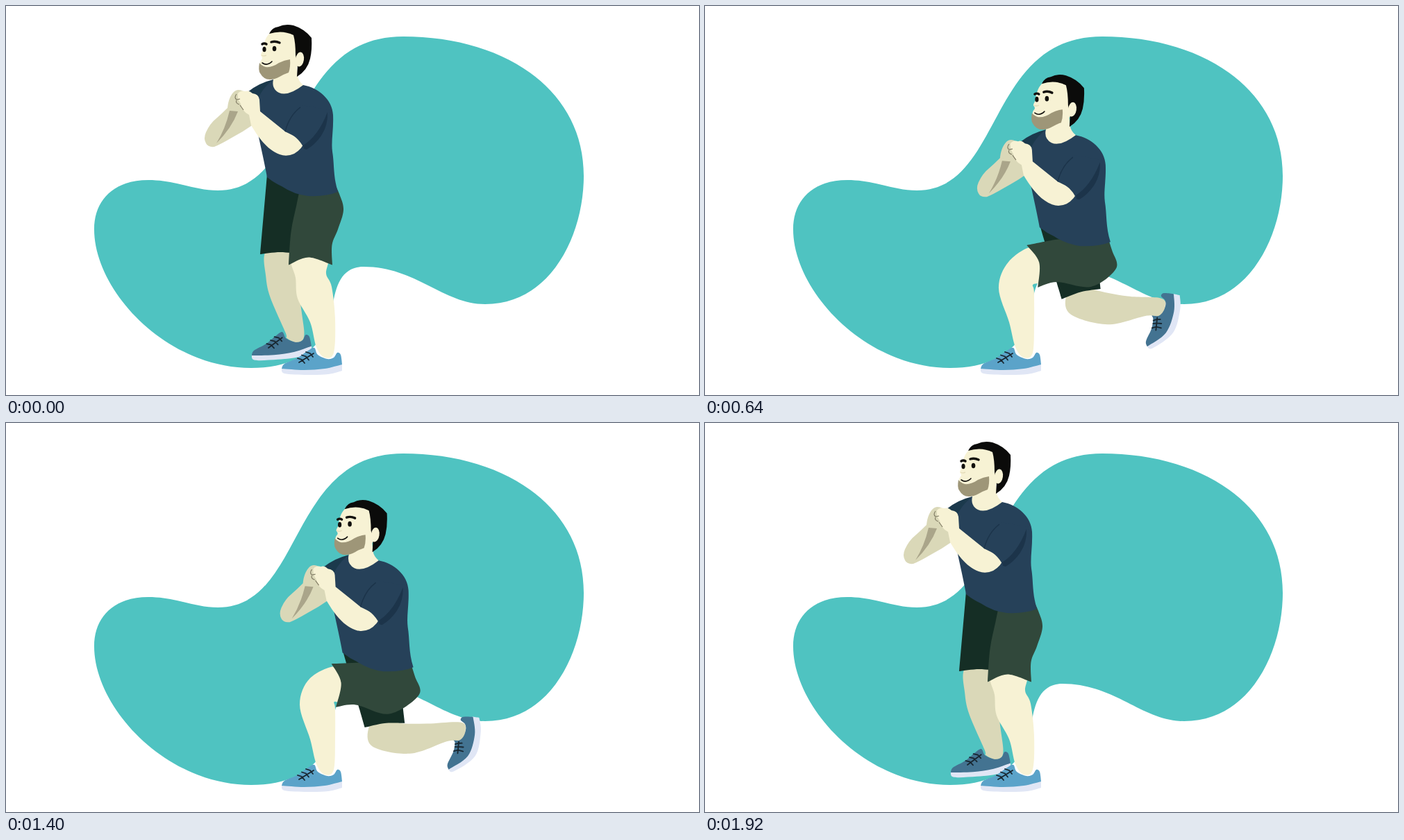
These frames come from a looping animation (998x561 px, 1960 ms). An HTML page:

```html
<!DOCTYPE html>
<html lang="en">
<head>
<meta charset="utf-8">
<title>Lunge</title>
<style>
html, body { margin: 0; width: 100%; height: 100%; overflow: hidden; background: #fff; }
svg { display: block; width: 100%; height: 100%; }
</style>
</head>
<body>
<svg viewBox="0 0 998 561">
  <path fill="#4fc3c1" d="M127 322C127 280 155 251 205 251C245 251 270 266 305 266C430 266 405 44 572 44C715 44 832 118 832 245C832 330 785 430 690 430C630 430 590 376 515 376C485 376 475 400 470 435C460 500 410 522 353 522C230 522 127 410 127 322Z"/>
  <g id="backShoe"></g>
  <path id="backLeg" fill="#dad8b8"/>
  <path id="backShorts" fill="#152e25"/>
  <g id="frontShoe"></g>
  <path id="frontLeg" fill="#f7f2d4"/>
  <path id="frontShorts" fill="#31483b"/>
  <g id="torso">
    <!-- far arm -->
    <path fill="#dad8b8" d="M319 147C320 138 322 131 327 125Q333 118 342 123L352 145L356 171Q342 181 325 190Q308 200 300 203Q291 204 288 198Q284 191 288 182Q294 169 303 162Q311 155 319 147Z"/>
    <path fill="#aaa58a" d="M322 151L334 152Q325 176 303 198Q316 177 322 151Z"/>
    <path fill="#1b394c" d="M348 124Q364 111 385 106L380 130L360 150Z"/>
    <!-- shirt -->
    <path fill="#264159" d="M385 106Q396 114 428 114C450 118 470 135 471 157C472 178 468 195 470 210C473 228 471 246 478 268Q462 275 435 274Q415 272 397 260Q386 255 376 247Q374 236 370 217L362 180L357 150Q364 122 385 106Z"/>
    <!-- neck and head -->
    <path fill="#f7f2d4" d="M385 106Q382 119 393 125Q406 131 428 114Q421 108 420 101L417 72L386 96Z"/>
    <path fill="#f7f2d4" d="M380 39C373 46 371 55 370 64Q367 69 367 71Q369 73 369 76Q365 80 365 88L380 104L409 95L424 85L418 40L400 34Z"/>
    <path fill="#0b0b0a" d="M379 40Q383 31 392 30Q402 25 414 28Q430 33 440 46Q441 63 438 76Q434 93 419 102L420 85L417 71Q417 53 414 42Q398 34 379 40Z"/>
    <ellipse cx="423" cy="77" rx="6" ry="10.500" fill="#f7f2d4" transform="rotate(8 423 77)"/>
    <path fill="#9e9678" d="M365 82Q363 93 366 97Q371 106 380 106Q387 106 394 102Q401 98 407 96Q410 88 409 77Q401 78 393 82Q383 89 374 88Q368 86 365 82Z"/>
    <g fill="none" stroke="#12100d" stroke-linecap="round">
      <path stroke-width="3.400" d="M369 55Q372 53 375 55M382 52Q388 50 394 53"/>
      <path stroke-width="1.600" d="M369 82Q376 87 383 80"/>
    </g>
    <ellipse cx="372" cy="62.500" rx="2.600" ry="3.800" fill="#12100d"/>
    <ellipse cx="386.500" cy="61.500" rx="2.800" ry="3.800" fill="#12100d"/>
    <path fill="none" stroke="#e4dcb8" stroke-width="1.500" d="M368 71Q371 73 375 71"/>
    <!-- near arm -->
    <path fill="#f7f2d4" d="M334 126Q338 121 345 123Q350 121 355 126Q364 127 365 135L366 152L402 181L430 195Q427 206 415 213Q404 218 394 214C375 207 362 187 353 172L350 157Q339 151 338 141Q333 134 334 126Z"/>
    <path fill="none" stroke="#837e66" stroke-width="1.200" d="M332 127Q328 132 332 135L337 134M332 136Q330 140 336 142M337 143L342 150"/>
    <path fill="#264159" d="M426 143Q410 155 402 181Q420 187 429 205Q455 190 467 150Z"/>
    <path fill="#1c344a" d="M429 206L428 201Q450 187 463 153Q464 172 454 187Q445 200 433 207Z"/>
    <path fill="none" stroke="#1c344a" stroke-width="1.500" d="M424 146Q408 158 402 181"/>
  </g>
</svg>
<script>
const LOOP = 1960, STEP = 40;
const $ = id => document.getElementById(id);
const mix = (a, b, k) => a + (b - a) * k;
const between = (p, q, k) => [mix(p[0], q[0], k), mix(p[1], q[1], k)];
const ease = k => (1 - Math.cos(Math.PI * Math.min(Math.max(k, 0), 1))) / 2;

// Turns local points about an origin into stage points.
function frame([ox, oy], degrees = 0) {
  const a = degrees * Math.PI / 180, c = Math.cos(a), s = Math.sin(a);
  return (x, y) => [ox + x * c - y * s, oy + x * s + y * c];
}

// Closed smooth curve; indices listed in corners stay sharp.
function smooth(pts, corners = []) {
  const n = pts.length, at = i => pts[(i + n) % n];
  const sharp = i => corners.includes((i + n) % n);
  let d = 'M' + pts[0];
  for (let i = 0; i < n; i++) {
    const p = at(i), q = at(i + 1);
    const before = sharp(i) ? p : at(i - 1), after = sharp(i + 1) ? q : at(i + 2);
    const c1 = p.map((v, k) => v + (q[k] - before[k]) / 6);
    const c2 = q.map((v, k) => v - (after[k] - p[k]) / 6);
    d += `C${c1} ${c2} ${q}`;
  }
  return d + 'Z';
}

const setShape = (id, pts, corners) => $(id).setAttribute('d', smooth(pts, corners));

// The shoe lies around the ankle; its front curls up by bend degrees.
function drawShoe(id, color, ankle, angle, bend) {
  const place = frame(ankle, angle);
  const curl = ([x, y]) => {
    const amount = Math.min(Math.max((-10 - x) / 25, 0), 1);
    return place(...frame([-18, 10], bend * amount)(x + 18, y - 10));
  };
  const upper = [[-62, 16], [-58, 9], [-40, 1], [-24, -10], [-15, -14], [-10, -4],
    [4, 2], [13, 0], [18, -7], [23, -4], [25, 10], [0, 16], [-30, 18]].map(curl);
  const sole = [[-62, 15], [-58, 23], [-25, 25], [5, 24], [25, 19], [25, 9], [-30, 14]].map(curl);
  let laces = 'M' + [[-37, 7], [-16, -6]].map(curl).join('L');
  for (let i = 0; i < 3; i++)
    laces += 'M' + [[-39, 1], [-33, 3], [-29, 8]].map(([x, y]) => curl([x + 6 * i, y - 4.5 * i])).join('L');
  $(id).innerHTML = `<path fill="#e0e6f5" d="${smooth(sole, [0, 4, 5])}"/>
    <path fill="${color}" d="${smooth(upper, [0, 10])}"/>
    <path fill="none" stroke="#182630" stroke-width="1.8" stroke-linecap="round" d="${laces}"/>`;
}

function drawBackLeg(u, swing, body) {
  const lift = Math.sin(Math.PI * u * u);
  const hem = frame(body(395 + 42 * swing, 358 - 19 * lift), -19 * lift);
  const knee = frame(hem(-2, 25));
  const fold = u ** 0.62;
  const shin = frame(knee(0, 0), mix(78, -10, fold));
  const length = mix(102, 114, swing);
  setShape('backLeg', [hem(0, -20), hem(-22, -2), knee(-19, 5), shin(33, 20), shin(88, 9),
    shin(length - 6, 9), shin(length + 3, -4), shin(length - 3, -16), shin(63, -20), hem(19, -2)]);
  setShape('backShorts', [body(376, 243), hem(-29, 0), hem(0, -3), hem(29, 0),
    body(460, 300), body(420, 255)], [0, 1, 3, 4, 5]);
  drawShoe('backShoe', '#437391', shin(length, 0), mix(-5, -85, fold), 45 * u ** 1.5);
}

function drawFrontLeg(u, swing, body) {
  const hem = frame([438.5 + 33.5 * swing ** 0.7, 373.5 - 24 * u + 31 * u * u], 89 * u);
  setShape('frontLeg', [hem(0, -30), hem(-27, -9),
    between([417, 392], [438, 368], swing), between([420, 422], [423, 406], swing),
    [438, 456], [447, 492], [459, 507], [472, 500], [474, 452],
    between([469, 405], [474, 412], swing), between([461, 386], [473, 402], swing), hem(25, -12)]);
  const seat = body(...between([478, 322], [439, 337], u * u));
  setShape('frontShorts', [body(425, 255), hem(-20, -87), hem(-28, -48), hem(-31.5, 0), hem(-3, -11),
    hem(31.5, 0), hem(31, -29), seat, body(486, mix(294, 309, u)), body(480, mix(271, 281, u)),
    body(470, 250)], [0, 3, 5, 10]);
}

function draw() {
  const t = Math.floor(performance.now() % LOOP / STEP) * STEP;
  // Depth of the lunge: 0 standing, 1 deepest.
  const u = ease(t / 860) - ease((t - 1310) / 600);
  const swing = Math.sin(Math.PI / 2 * u);
  const shift = [109 * swing, 91 * u ** 1.4];
  const body = frame(shift);
  $('torso').setAttribute('transform', `translate(${shift})`);
  drawBackLeg(u, swing, body);
  drawFrontLeg(u, swing, body);
  requestAnimationFrame(draw);
}

drawShoe('frontShoe', '#5ba3c9', [459, 507], 0, 0);
draw();
</script>
</body>
</html>
```
